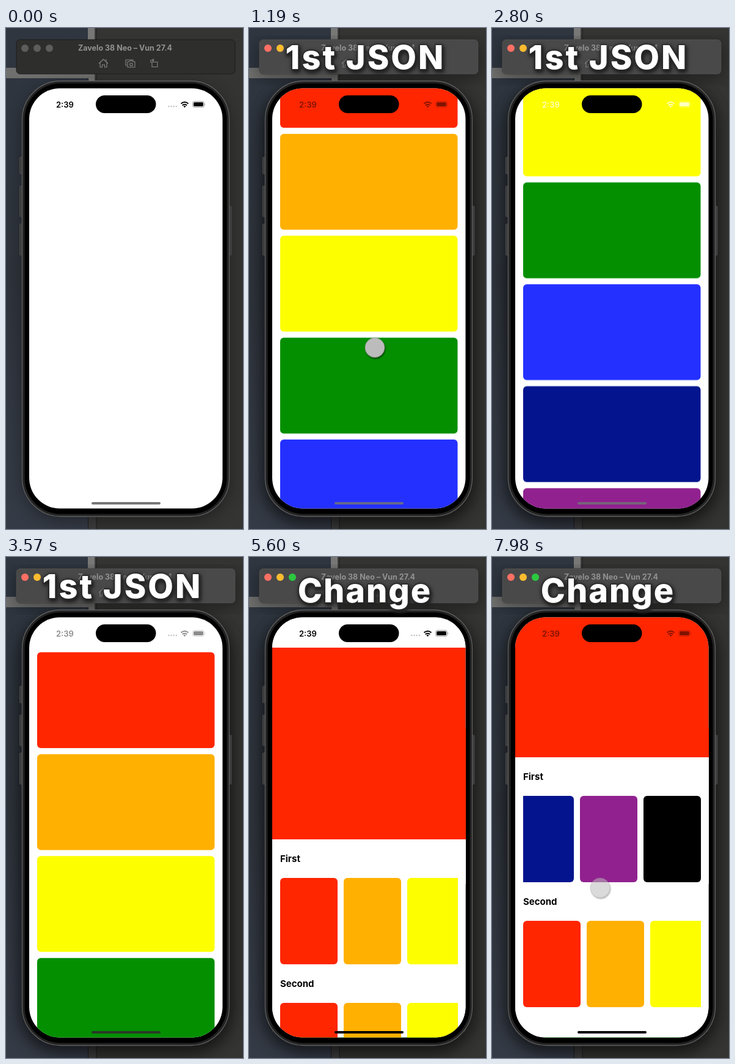
Animation of 388x818 px, one loop 8 s. Source, as an HTML page:

```html
<!DOCTYPE html>
<html lang="en">
<head>
<meta charset="utf-8">
<title>Layout demo</title>
<style>
html, body { margin: 0; width: 100%; height: 100%; overflow: hidden; background: #343432; }
svg { display: block; width: 100vw; height: 100vh; }
text { font-family: Inter, "Open Sans", sans-serif; }

.on, .list, .page, .row, .touch, .status, .dots, .home, .title {
  animation: 8s linear infinite;
}
.on { animation-name: appear; }
.list { animation-name: list; }
.cards { animation: appear 8s linear infinite; }
.layout { animation: swap 8s linear infinite; }
.page { animation-name: page; }
.row { animation-name: row; }
.touch { animation-name: touch; filter: drop-shadow(1px 2px 1px #0008); }
.status { animation-name: status; fill: currentColor; }
.dots { animation-name: dots; }
.home { animation-name: home; }
.title {
  font-size: 54px; font-weight: 800; fill: #fff; text-anchor: middle; letter-spacing: 2px;
  paint-order: stroke; stroke: #2b2b2b; stroke-width: 3px; stroke-linejoin: round;
  filter: drop-shadow(2px 3px 2px #222) drop-shadow(0 1px 3px #222);
}
.t1 { animation-name: first-title; letter-spacing: 3px; }
.t2 { animation-name: swap; }
.heading { font-size: 15px; font-weight: 700; }

@keyframes appear { 0%, .9% { opacity: 0 } 7%, 100% { opacity: 1 } }
@keyframes swap { 0%, 53% { opacity: 0 } 58.7%, 100% { opacity: 1 } }
@keyframes first-title {
  0%, .9% { opacity: 0 } 7%, 53% { opacity: 1 } 58.7%, 100% { opacity: 0 }
}
@keyframes list {
  0%, 12.5% { transform: none }
  14.875% { transform: translateY(-148px) }
  16.875% { transform: translateY(-330px); animation-timing-function: cubic-bezier(.25, .6, .5, 1) }
  21.25% { transform: translateY(-745px); animation-timing-function: ease-in-out }
  26.25%, 32% { transform: translateY(-725px) }
  35% { transform: translateY(-404px); animation-timing-function: cubic-bezier(.3, .36, .7, .85) }
  39.5% { transform: none; animation-timing-function: ease-out }
  40.75% { transform: translateY(25px); animation-timing-function: ease-in-out }
  44%, 100% { transform: none }
}
@keyframes row {
  0%, 71.25% { transform: none }
  74.375% { transform: translateX(-160px); animation-timing-function: ease-out }
  81.25%, 84.5% { transform: translateX(-303px) }
  86.625% { transform: translateX(-423px) }
  87.625% { transform: translateX(-480px); animation-timing-function: ease-out }
  89.75% { transform: translateX(-545px); animation-timing-function: ease-in-out }
  92.5%, 100% { transform: translateX(-531px) }
}
@keyframes page {
  0%, 93.5% { transform: none }
  99.75%, 100% { transform: translateY(-134px) }
}
@keyframes touch {
  0%, 11.8% { transform: translate(206px, 671px); opacity: 0 }
  12.5% { transform: translate(206px, 671px); opacity: 1 }
  14.875% { transform: translate(206px, 523px); opacity: 1 }
  16.875% { transform: translate(206px, 341px); opacity: 1 }
  17.8% { transform: translate(206px, 320px); opacity: 0 }
  31.3% { transform: translate(200px, 300px); opacity: 0 }
  32% { transform: translate(200px, 300px); opacity: 1 }
  34.2% { transform: translate(200px, 535px); opacity: 1 }
  34.9% { transform: translate(200px, 610px); opacity: 0 }
  70.5% { transform: translate(290px, 620px); opacity: 0 }
  71.25% { transform: translate(290px, 620px); opacity: 1 }
  74.375% { transform: translate(130px, 620px); opacity: 1 }
  75.3% { transform: translate(120px, 620px); opacity: 0 }
  83.8% { transform: translate(290px, 640px); opacity: 0 }
  84.5% { transform: translate(290px, 640px); opacity: 1 }
  86.625% { transform: translate(170px, 640px); opacity: 1 }
  87.625% { transform: translate(113px, 640px); opacity: 1 }
  88.5% { transform: translate(105px, 640px); opacity: 0 }
  92.8% { transform: translate(177px, 674px); opacity: 0 }
  93.5% { transform: translate(177px, 674px); opacity: 1 }
  99.2% { transform: translate(177px, 552px); opacity: 1 }
  99.75%, 100% { transform: translate(177px, 540px); opacity: .55 }
}
@keyframes status {
  0%, 12.5% { color: #000; opacity: 1 }
  14.875% { color: #000; opacity: .5 }
  17.5%, 39% { color: #fff; opacity: .75 }
  41.5% { color: #000; opacity: .15 }
  44.625% { color: #000; opacity: .45 }
  48%, 94.5% { color: #000; opacity: 1 }
  99.75%, 100% { color: #000; opacity: .5 }
}
@keyframes dots {
  0%, 12.5% { opacity: 1 } 14%, 42% { opacity: 0 }
  44%, 95% { opacity: 1 } 98%, 100% { opacity: 0 }
}
@keyframes home {
  0%, 6% { fill: #777 }
  14.875% { fill: #66698f }
  35% { fill: #776379 }
  44.625% { fill: #293a29 }
  54%, 100% { fill: #000 }
}
</style>
</head>
<body>
<svg viewBox="0 0 388 818" preserveAspectRatio="none">
  <defs>
    <linearGradient id="left" x2="0" y2="1">
      <stop stop-color="#2f3640"/><stop offset=".5" stop-color="#2e333b"/><stop offset="1" stop-color="#353b46"/>
    </linearGradient>
    <filter id="blur" x="-20%" y="-20%" width="140%" height="140%"><feGaussianBlur stdDeviation="13"/></filter>
    <clipPath id="screen"><rect x="38" y="98.500" width="316.500" height="686" rx="50"/></clipPath>
    <clipPath id="rowClip"><rect x="51" y="500" width="291" height="400"/></clipPath>
  </defs>

  <!-- desktop -->
  <rect width="388" height="818" fill="#343432"/>
  <rect width="134" height="818" fill="url(#left)"/>
  <rect x="134" width="14" height="818" fill="#3d3d3e"/>
  <rect x="134" width="11" height="87" fill="#777776"/>
  <rect y="65" width="145" height="17" fill="#6f6f6e"/>
  <path d="M134.500 82V818M148 0V818" stroke="#1d1d1d"/>
  <rect x="26" y="92" width="340" height="714" rx="66" opacity=".35" filter="url(#blur)"/>
  <g class="on">
    <rect x="14" y="24" width="364" height="58" rx="8" opacity=".35" filter="url(#blur)"/>
    <rect x="22" y="98" width="348" height="712" rx="66" opacity=".4" filter="url(#blur)"/>
  </g>

  <!-- window bar -->
  <rect x="17" y="19" width="358" height="56" rx="6" fill="#2e2e2d" stroke="#1c1c1c"/>
  <rect class="on" x="17" y="19" width="358" height="56" rx="6" fill="#494949" stroke="#5a5a5a" stroke-width=".7"/>
  <g fill="#5d5d5c"><circle cx="31" cy="33" r="6"/><circle cx="51" cy="33" r="6"/><circle cx="71" cy="33" r="6"/></g>
  <g class="on">
    <circle cx="31" cy="33" r="6" fill="#ff6f63"/>
    <circle cx="51" cy="33" r="6" fill="#fdbc2f"/>
    <circle cx="71" cy="33" r="6" fill="#2bc840"/>
  </g>
  <text x="195" y="37" text-anchor="middle" font-size="12.500" font-weight="700" fill="#929291">Zavelo 38 Neo – Vun 27.4</text>
  <g fill="none" stroke="#858584" stroke-width="1.100" stroke-linejoin="round">
    <path d="M152 58l7.500-7 7.500 7M154 57v7h3.500v-4h4v4h3.500v-7M164 54v-3"/>
    <path d="M198 61h-2v-9h12v2"/>
    <path d="M199 55h3l1-1.500h4l1 1.500h3v9h-12z"/><circle cx="205" cy="59.500" r="2.300"/>
    <path d="M239 55.500h9v8h-9zM237 57v-4.500h5M240 50.500l2 2-2 2"/>
  </g>

  <!-- phone -->
  <g fill="#3b3b3b" stroke="#555" stroke-width=".7">
    <rect x="22.500" y="211" width="6" height="27" rx="1"/>
    <rect x="22.500" y="258" width="6" height="50" rx="1"/>
    <rect x="22.500" y="320" width="6" height="51" rx="1"/>
    <rect x="363" y="291" width="6" height="80" rx="1"/>
  </g>
  <rect x="26.500" y="86.500" width="339" height="711" rx="63" fill="#222" stroke="#606060" stroke-width="1.300"/>
  <rect x="30.500" y="90.500" width="331" height="703" rx="59"/>
  <g clip-path="url(#screen)">
    <rect x="38" y="98" width="317" height="687" fill="#fff"/>
    <g class="cards"><g class="list" id="cards"></g></g>
    <g class="layout">
      <rect x="38" y="98" width="317" height="687" fill="#fff"/>
      <g class="page">
        <rect x="38" y="148" width="317" height="313" fill="#ff2600"/>
        <text class="heading" x="51" y="498">First</text>
        <text class="heading" x="51" y="702">Second</text>
        <g clip-path="url(#rowClip)">
          <g class="row" id="row1"></g>
          <g id="row2"></g>
        </g>
      </g>
    </g>
    <g class="status">
      <text x="82" y="129.500" font-size="13" font-weight="600">2:39</text>
      <g fill="none" stroke="currentColor" stroke-width="2">
        <path d="M286.500 123.500q6-5 12 0M288.700 126.200q3.800-3 7.600 0"/>
      </g>
      <path d="M290.300 127.800q2.200-1.500 4.400 0l-2.200 2.300z"/>
      <rect x="305.500" y="119.800" width="19" height="9.800" rx="3" fill="none" stroke="currentColor" opacity=".4"/>
      <rect x="307" y="121.300" width="16" height="6.800" rx="1.800"/>
      <path d="M325.700 123q1.500 1.700 0 3.400z" opacity=".5"/>
    </g>
    <path class="dots" d="M266.300 128h14" stroke="#c4c4c4" stroke-width="2.600" stroke-linecap="round" stroke-dasharray="0 4.200"/>
    <rect class="home" x="140" y="774" width="113" height="4" rx="2"/>
  </g>
  <rect x="147" y="110" width="98.500" height="29" rx="14.500"/>

  <g class="touch"><circle r="16" fill="#bcbcbc" stroke="#999" stroke-width=".7"/></g>
  <text class="title t1" x="190.500" y="67">1st JSON</text>
  <text class="title t2" x="189.500" y="74">Change</text>
</svg>
<script>
const colors = ["#ff2600", "#ffb000", "#fdff00", "#048f00", "#2430ff", "#03148e", "#91218f", "#000"];

function addTiles(id, x, y, width, height, stepX, stepY) {
  document.getElementById(id).innerHTML = colors.map((fill, i) =>
    `<rect x="${x + i * stepX}" y="${y + i * stepY}" width="${width}" height="${height}" rx="6" fill="${fill}"/>`
  ).join("");
}

addTiles("cards", 51, 155.5, 290.5, 156.5, 0, 166.4);
addTiles("row1", 51, 524, 94, 141, 104, 0);
addTiles("row2", 51, 728, 94, 141, 104, 0);
</script>
</body>
</html>
```
